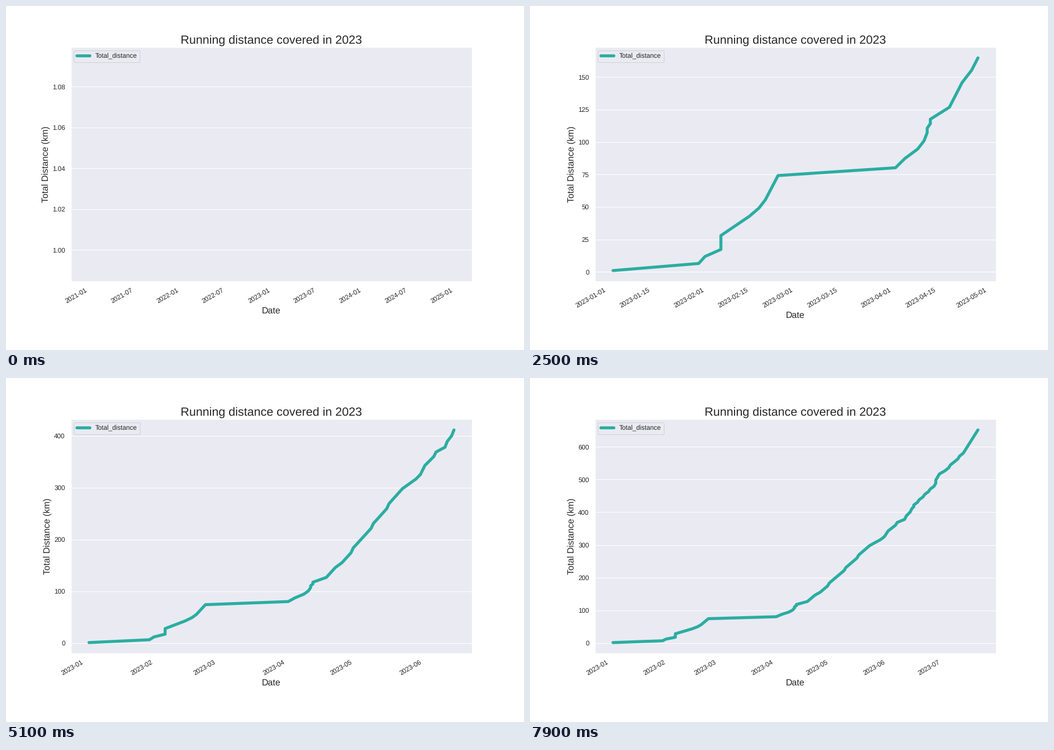
Recreate the animation shown at these times as a matplotlib script. Size 917x611 px, loop 8 s.

```python
import matplotlib.pyplot as plt
import matplotlib.dates as mdates
import numpy as np
from matplotlib.animation import FuncAnimation

DPI = 76.4
RUNS = 80
INK, PANEL, TEAL = "0.15", "#EAEAF2", "#2BADA2"

plt.rcParams.update({
    "font.family": "Liberation Sans", "text.hinting": "none",
    "text.color": INK, "axes.labelcolor": INK,
    "xtick.color": INK, "ytick.color": INK,
    "axes.facecolor": PANEL, "axes.edgecolor": "white",
    "axes.linewidth": 1.25, "axes.axisbelow": True,
    "grid.color": "white", "grid.linewidth": 1,
    "lines.solid_capstyle": "round",
})

# Turning points of the season: run number, day, total km.
# Between them the runs are evenly spread, each on a whole day.
turns = [
    (0, 0, 1.042), (1, 27, 6.5), (2, 29, 11.9), (3, 34, 17.3), (5, 34, 28),
    (8, 43, 42.9), (10, 48, 55.5), (12, 52, 74.2), (13, 89, 80.2),
    (15, 96, 94.6), (17, 99, 107.2), (20, 100, 117.6), (21, 106, 126.8),
    (25, 115, 164.8), (33, 129, 240.4), (39, 140, 298.2), (41, 146, 316.7),
    (47, 155, 368.9), (48, 159, 378.2), (51, 163, 411.6), (53, 164, 422.3),
    (60, 175, 479.3), (64, 178, 517.4), (65, 181, 527), (71, 191, 581),
    (79, 199, 652.2),
]
at, day, km = np.transpose(turns)
run = np.arange(RUNS)
total = np.interp(run, at, km)
dates = (mdates.date2num(np.datetime64("2023-01-03"))
         + np.round(np.interp(run, at, day)))

fig, ax = plt.subplots(figsize=(917.001 / DPI, 611.001 / DPI), dpi=DPI)
line, = ax.plot([], [], color=TEAL, lw=5, label="Total_distance")
ax.xaxis_date()
ax.grid(axis="y")
ax.tick_params(length=6, labelsize=11, bottom=False, left=False)
ax.set_title("Running distance covered in 2023", fontsize=20)
ax.set_xlabel("Date", fontsize=15)
ax.set_ylabel("Total Distance (km)", fontsize=15)
ax.legend(loc="upper left", fontsize=11)


def update(i):
    line.set_data(dates[:i + 1], total[:i + 1])
    ax.relim()
    ax.autoscale_view()
    fig.autofmt_xdate(bottom=0.2, rotation=30, ha="right")
    return line,


anim = FuncAnimation(fig, update, frames=RUNS, interval=100,
                     repeat=True, repeat_delay=0)
plt.show()
```
